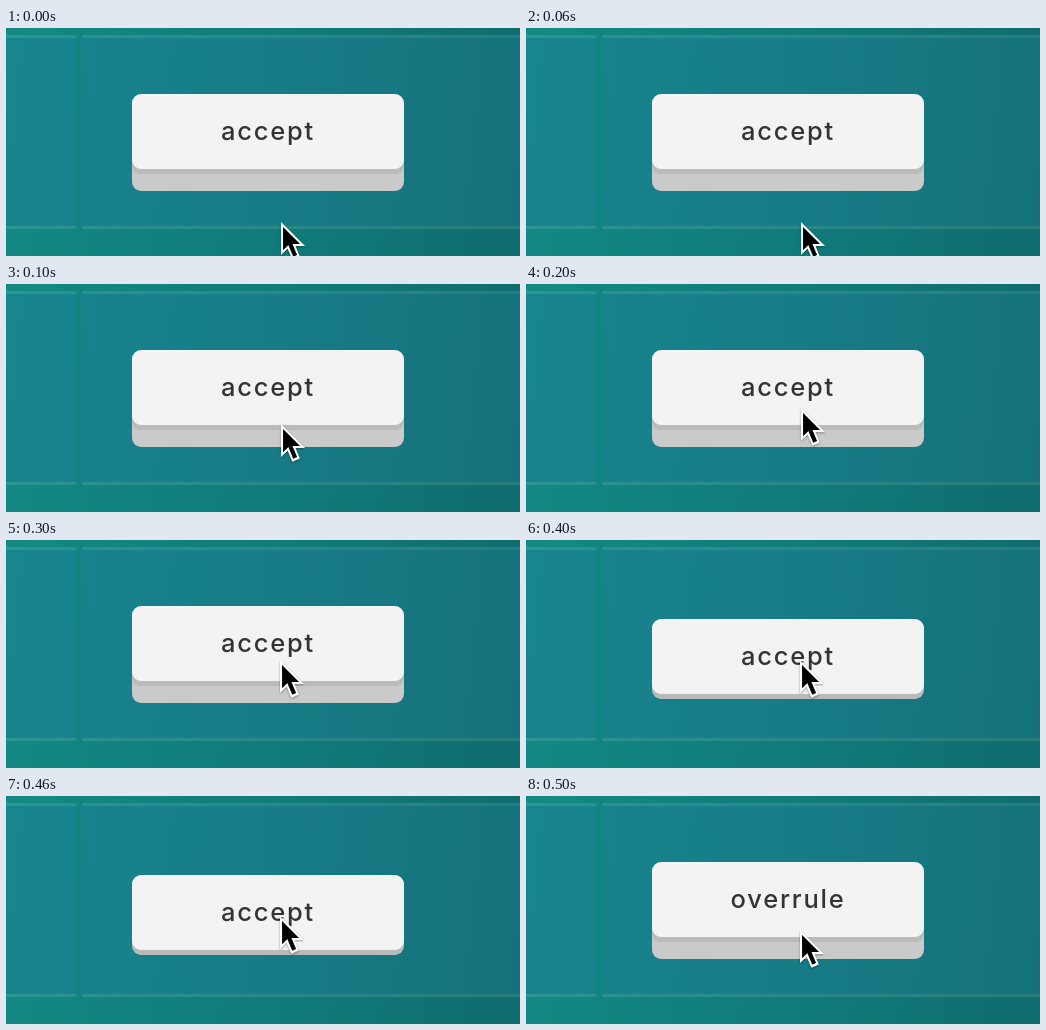
An HTML page for the animation above (0.6 s loop, 514 by 228 pixels).

```html
<!DOCTYPE html>
<html lang="en">
<head>
<meta charset="utf-8">
<title>Button press</title>
<style>
  html, body { margin: 0; width: 100%; height: 100%; overflow: hidden; }
  body {
    position: relative;
    background: linear-gradient(96deg, #128a84, #107c7b 50%, #0f6c6e);
  }
  .panel {
    position: absolute;
    top: 7px;
    height: 188px;
    border: solid rgba(255, 255, 255, .11);
    border-width: 3px 0;
    background: linear-gradient(96deg, #18868f, #177c86 50%, #14717a) 0 0 / 514px 100%;
    background-clip: padding-box;
  }
  .left { left: 0; width: 70px; border-radius: 0 2px 2px 0; }
  .right { left: 76px; width: 438px; border-radius: 2px 0 0 2px; background-position: -76px 0; }
  #key {
    position: absolute;
    left: 126px;
    top: 66px;
    width: 272px;
    height: 75px;
    border-radius: 9px;
    background: #f3f3f3;
    color: #333;
    font: 500 25.5px/73px Inter, "Open Sans", sans-serif;
    letter-spacing: 1.75px;
    text-align: center;
    white-space: nowrap;
  }
  #arrow {
    position: absolute;
    left: 0;
    top: 0;
    width: 514px;
    height: 228px;
    overflow: hidden;
  }
  #pointer { filter: drop-shadow(0 1px 1px rgba(0, 0, 0, .35)); }
</style>
</head>
<body>
<div class="panel left"></div>
<div class="panel right"></div>
<div id="key">accept</div>
<svg id="arrow" viewBox="0 0 514 228">
  <g id="pointer">
    <g transform="scale(2.07) translate(-8.2 -4.9)">
      <path fill="#fff" d="M8.2 20.9V4.9l11.6 11.6H13l-.4.1zM17.3 21.6l-3.6 1.5L9 12l3.7-1.5z"/>
      <path d="M9.2 7.3v11.2l3-2.9.4-.1h4.8z"/>
      <rect x="12.5" y="13.6" width="2" height="8" transform="matrix(.9221 -.3871 .3871 .9221 -5.7605 6.5909)"/>
    </g>
  </g>
</svg>
<script>
  const STEP = 100;
  const REST = 66, DOWN = 79;
  const steps = [
    { x: 275, y: 194 },
    { x: 275, y: 140 },
    { x: 275, y: 124 },
    { x: 274, y: 120 },
    { x: 274, y: 120, down: true },
    { x: 274, y: 134, label: "overrule" }
  ];
  const key = document.getElementById("key");
  const pointer = document.getElementById("pointer");
  let shown = -1;

  function show(i) {
    if (i === shown) return;
    shown = i;
    const { x, y, down = false, label = "accept" } = steps[i];
    key.textContent = label;
    key.style.top = (down ? DOWN : REST) + "px";
    key.style.boxShadow = "0 5px #bababa" + (down ? "" : ", 0 22px #cacaca");
    pointer.setAttribute("transform", `translate(${x} ${y})`);
  }

  const start = performance.now();
  function tick(now) {
    const t = Math.max(0, now - start);
    show(Math.floor(t / STEP) % steps.length);
    requestAnimationFrame(tick);
  }
  show(0);
  requestAnimationFrame(tick);
</script>
</body>
</html>
```
